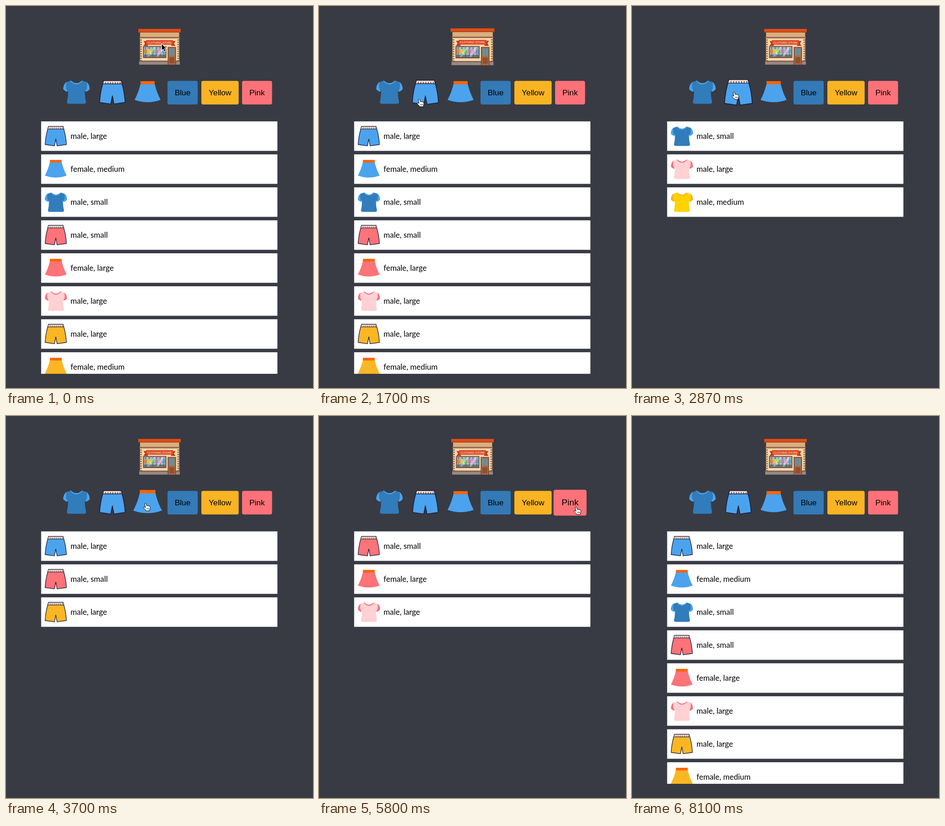
An HTML page for the animation above (8630 ms loop, 671 by 834 pixels).

```html
<!DOCTYPE html>
<html lang="en">
<head>
<meta charset="utf-8">
<title>Clothing store filter</title>
<style>
  html, body { margin: 0; width: 100%; height: 100%; overflow: hidden; background: #383b43; }
  svg { display: block; }
  .row { font: 17px Lato, "Noto Sans", sans-serif; }
  .button { font: 17.3px "Liberation Sans", Arial, sans-serif; text-anchor: middle; }
  .sign { font: 6px "Liberation Sans", Arial, sans-serif; text-anchor: middle; fill: #fff; }
</style>
</head>
<body>
<svg id="stage" width="671" height="834" viewBox="0 0 671 834">
  <clipPath id="listClip"><path d="M76 251h518v552H76z"/></clipPath>
  <g id="list" clip-path="url(#listClip)"></g>
  <g id="menu"></g>
  <g id="cursor">
    <path id="arrow" d="M0 0V15.5L3.6 12.2L6 17.7L9 16.4L6.6 11H11.5Z" stroke="#fff" stroke-width="1.1"/>
    <g id="hand" fill="#fff" stroke="#000" stroke-linejoin="round">
      <path d="M-1.8 1.2Q-2 -.5 -.3 -.5Q1 -.5 1.4 1L2.6 5.2Q4.2 4 5.3 5.4Q7 4.4 8 6Q10 5.5 10.2 7.5Q11 11 9.4 13.2L9 16H1.5Q0 13.5 -2.4 11.4Q-5 9 -4.4 8Q-3.2 6.8 -.2 9Z"/>
      <path d="M3.2 10v3m2.2-3v3m2.2-3v3" fill="none" stroke-width=".8"/>
    </g>
  </g>
</svg>
<script>
const LOOP = 8630, FADE = 300, WAKE = 30;
const $ = id => document.getElementById(id);

const palette = {
  blue:   { main: '#4ba3ee', body: '#317cbb', trim: '#4ba3ee' },
  pink:   { main: '#fc7378', body: '#ffd0d4', trim: '#f4727c' },
  yellow: { main: '#fab723', body: '#ffd200', trim: '#f9b02a' }
};

const draw = {
  shirt: c => `
    <path fill="${c.body}" d="M17 1Q29 12 41 1L51 4Q57 8 58 19Q55 24 49 25L47.5 22Q47 36 50 47Q50 51.5 45 51.5H13Q8 51.5 8 47Q11 36 10.5 22L9 25Q3 24 0 19Q1 8 7 4Z"/>
    <path fill="${c.trim}" d="M7 4Q1 8 0 19Q3 24 9 25L9.5 23Q4 18 7 4ZM51 4Q57 8 58 19Q55 24 49 25L48.5 23Q54 18 51 4ZM17 1Q29 12 41 1L43 1.6Q29 17 15 1.6Z"/>`,
  shorts: c => `
    <path fill="${c.main}" stroke="#1c1c3c" stroke-width="1.6" stroke-linejoin="round" d="M9.5 1H47.5L49.5 8Q55 26 56.4 48.5L32 52L28.5 34L25 52L.6 48.5Q2 26 7.5 8Z"/>
    <path fill="#fde0cc" stroke="#1c1c3c" stroke-width="1.3" d="M9.5 1H47.5L49.5 8H7.5Z"/>
    <path stroke="#1c1c3c" stroke-width="4" stroke-dasharray="1.2 4.1" d="M13 6H46"/>`,
  skirt: c => `
    <path fill="${c.main}" d="M13 6H44Q48 24 57 41Q43 46 28.5 46Q14 46 0 41Q9 24 13 6Z"/>
    <path fill="#fb6505" d="M13 0H44V7H13Z"/>`
};

const rect = (x, y, w, h, fill) => `<rect x="${x}" y="${y}" width="${w}" height="${h}" fill="${fill}"/>`;

function drawStore() {
  let s = rect(289, 50, 93, 7, '#de4c17') + rect(289, 56, 93, 2, '#b5421c') +
    rect(293, 58, 85.5, 10, '#d8b07e') + rect(291.5, 67.5, 88.5, 3, '#9c6248') +
    rect(293, 70.5, 85.5, 50, '#f3d8ac');
  for (let y = 73; y < 119; y += 5)
    s += rect(292, y, 5, 2.6, '#9c6a4a') + rect(374.5, y, 5, 2.6, '#9c6a4a');
  s += rect(291, 119.5, 89, 8.5, '#9b8880') + rect(291, 119.5, 89, 2, '#74564d') +
    rect(299.5, 87.5, 51, 26, '#76463c') + rect(301.5, 89.5, 47, 21, '#9bc4cb') +
    rect(301.5, 106, 47, 4.5, '#657a83');
  ['#e4803b', '#f1c52e', '#69bd4b', '#ce73b6', '#ed76ad', '#5b9cc9'].forEach((color, i) => {
    s += `<g transform="translate(${305 + i * 8} 92)"><circle r="1.4" fill="#685456"/>
      <path d="M0 4v14" stroke="#493f45"/><path d="M-2.2 2h4.4l1.4 9h-7.2z" fill="${color}"/></g>`;
  });
  return s + `<path d="M322 89.5h5l-14 21h-5zM340 89.5h7l-14 21h-5z" fill="#fff" opacity=".35"/>` +
    rect(353.5, 89.5, 18, 39, '#75402d') + rect(355, 91, 15, 37, '#ac6745') +
    rect(356.5, 92.5, 12, 16, '#60939e') + rect(362, 92.5, 1, 16, '#ac6745') +
    rect(357, 112, 11, 13, '#91502f') +
    `<path d="M300.5 76.5H310V87H300.5L304 82ZM370.5 76.5H361V87H370.5L367 82Z" fill="#bd3518"/>
    <path d="M306 74.5H365V84.5H306Z" fill="#de4a23"/>
    <text class="sign" x="335.5" y="81.7">CLOTHING STORE</text>`;
}

const icon = (kind, color, x, y, scale = 1) =>
  `<g transform="translate(${x} ${y}) scale(${scale})">${draw[kind](palette[color])}</g>`;

const iconControl = (kind, x, y) => ({ x, y, w: 57, h: 52, art: icon(kind, 'blue', x, y) });

const buttonControl = (label, x, w, color) => ({
  x, y: 163.5, w, h: 51.5,
  art: `<rect x="${x}" y="163.5" width="${w}" height="51.5" rx="4" fill="${color}"/>
    <text class="button" x="${x + w / 2}" y="194.8">${label}</text>`
});

const controls = [
  { x: 289, y: 50, w: 93, h: 78, art: drawStore() },
  iconControl('shirt', 125, 162),
  iconControl('shorts', 204, 162),
  iconControl('skirt', 281, 164),
  buttonControl('Blue', 353, 66, '#337ab7'),
  buttonControl('Yellow', 427, 81.5, '#fab423'),
  buttonControl('Pink', 516, 65.5, '#fd7278')
];

const items = [
  'blue shorts: male, large', 'blue skirt: female, medium', 'blue shirt: male, small',
  'pink shorts: male, small', 'pink skirt: female, large', 'pink shirt: male, large',
  'yellow shorts: male, large', 'yellow skirt: female, medium', 'yellow shirt: male, medium'
];

// Places where the pointer rests, and the filter clicked there
const stops = [
  { x: 340, y: 82, arrive: 0, leave: WAKE },
  { x: 340, y: 111, arrive: 1070, leave: 1530 },
  { x: 156, y: 206, arrive: 1810, leave: 2470, click: 2310, filter: 'shirt' },
  { x: 223, y: 188, arrive: 2790, leave: 3160, click: 3080, filter: 'shorts' },
  { x: 305, y: 191, arrive: 3550, leave: 3970, click: 3780, filter: 'skirt' },
  { x: 376, y: 199, arrive: 4300, leave: 4580, click: 4420, filter: 'blue' },
  { x: 466, y: 200, arrive: 5020, leave: 5180, click: 5100, filter: 'yellow' },
  { x: 562, y: 199, arrive: 5670, leave: 6000, click: 5770, filter: 'pink' },
  { x: 326, y: 80, arrive: 7100, leave: 7300, click: 7270, filter: '' },
  { x: 700, y: 96, arrive: 7930, leave: LOOP }
];

const clamp = u => Math.min(1, Math.max(0, u));
const smooth = u => (u = clamp(u), u * u * (3 - 2 * u));
const ease = u => 1 - (1 - clamp(u)) ** 2.3;

function pointerAt(t) {
  const i = Math.max(1, stops.findIndex(s => t <= s.leave));
  const a = stops[i - 1], b = stops[i];
  const u = clamp((t - a.leave) / (b.arrive - a.leave));
  // Height settles before the sideways motion, which bends the path
  return [a.x + (b.x - a.x) * smooth(u), a.y + (b.y - a.y) * smooth(u * 1.5)];
}

function isOver(c, t) {
  const [x, y] = pointerAt(t);
  return t >= WAKE && x >= c.x && x <= c.x + c.w && y >= c.y && y <= c.y + c.h;
}

function hoverSpans(c) {
  const spans = [];
  for (let t = 0, was = false; t < LOOP; t += 5) {
    const over = isOver(c, t);
    if (over && !was) spans.push([t, t]);
    if (over) spans[spans.length - 1][1] = t;
    was = over;
  }
  return spans;
}

const hoverAmount = (t, spans) => Math.max(...spans.map(([start, end]) =>
  ease((Math.min(t, end) - start) / FADE) * (1 - ease((t - end) / FADE))));

function showList(filter) {
  const iconTop = { shirt: 10.5, shorts: 10, skirt: 12 };
  $('list').innerHTML = items.filter(item => item.includes(filter)).map((item, i) => {
    const [name, text] = item.split(': '), [color, kind] = name.split(' ');
    const y = 252 + i * 72;
    return rect(76.8, y - .1, 516.4, 64.4, '#fff') +
      icon(kind, color, 85, y + iconTop[kind], .835) +
      `<text class="row" x="141" y="${y + 37.5}">${text}</text>`;
  }).join('');
}

$('menu').innerHTML = controls.map(c => `<g>${c.art}</g>`).join('');
controls.forEach((c, i) => {
  c.group = $('menu').children[i];
  c.spans = hoverSpans(c);
});

let begin, shown;

function frame(now) {
  begin ??= now;
  const t = (now - begin) % LOOP;
  const clicked = stops.filter(s => s.click <= t).pop();
  const filter = clicked ? clicked.filter : '';
  if (filter !== shown) showList(shown = filter);

  for (const { x, y, w, h, group, spans } of controls) {
    const grow = .1 * hoverAmount(t, spans);
    group.setAttribute('transform',
      `translate(${-grow * (x + w / 2)} ${-grow * (y + h / 2)}) scale(${1 + grow})`);
  }

  const active = controls.some(c => isOver(c, t));
  $('hand').style.display = active ? '' : 'none';
  $('arrow').style.display = active ? 'none' : '';
  $('cursor').setAttribute('transform', `translate(${pointerAt(t)})`);
  requestAnimationFrame(frame);
}
requestAnimationFrame(frame);
</script>
</body>
</html>
```
